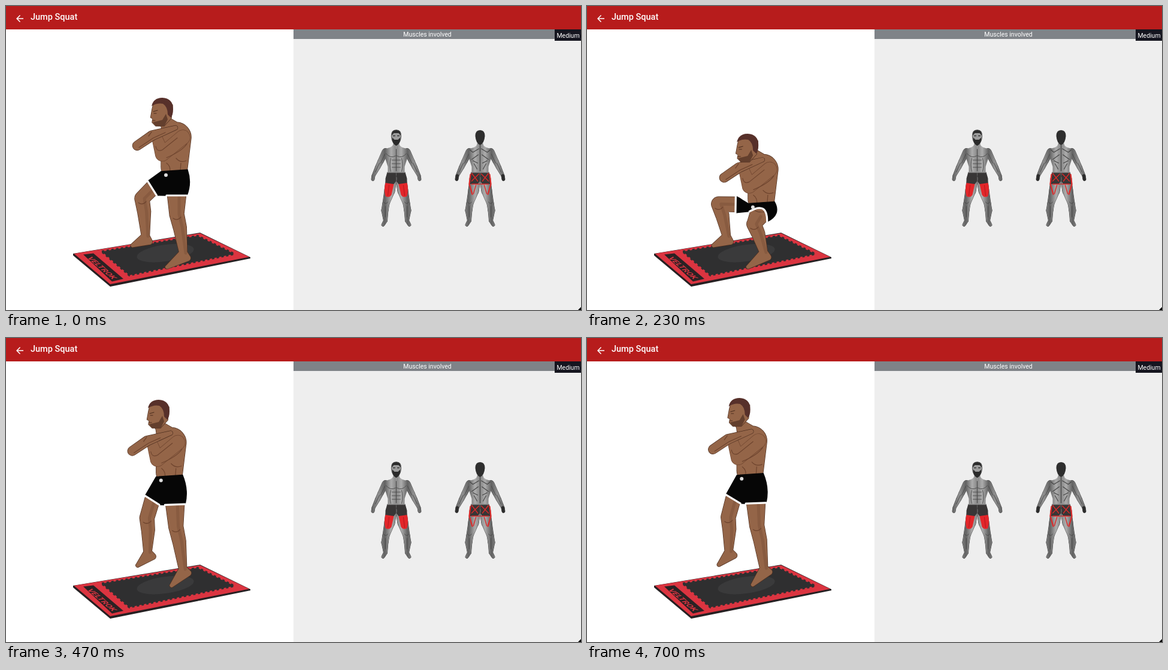
An HTML page that plays this animation: 960 px wide and 507 px high, repeating every 0.78 s.

```html
<!DOCTYPE html>
<html lang="en">
<head>
<meta charset="utf-8">
<title>Jump Squat</title>
<style>
  html, body { margin: 0; width: 100%; height: 100%; overflow: hidden; background: #fff; }
  svg { display: block; width: 960px; height: 507px; font-family: Roboto, sans-serif; }
</style>
</head>
<body>
<svg viewBox="0 0 960 507">
  <defs>
    <linearGradient id="grey" gradientUnits="userSpaceOnUse" x1="0" x2="42">
      <stop offset="0" stop-color="#858585"/><stop offset=".2" stop-color="#adadad"/>
      <stop offset=".45" stop-color="#626262"/><stop offset=".7" stop-color="#929292"/>
      <stop offset="1" stop-color="#606060"/>
    </linearGradient>
    <clipPath id="crop"><path d="M0 82H480V507H0z"/></clipPath>
  </defs>

  <path fill="#b71c1c" d="M0 0H960V39H0z"/>
  <path fill="#fff" transform="translate(14 12) scale(.75)" d="M20 11H7.83l5.59-5.59L12 4l-8 8 8 8 1.41-1.41L7.83 13H20z"/>
  <text x="41" y="23" font-size="14.5" font-weight="500" fill="#fff">Jump Squat</text>

  <path fill="#eee" d="M480 55H960V507H480z"/>
  <path fill="#7f8388" d="M480 39H960V55H480z"/>
  <text x="703.5" y="51" font-size="10.5" text-anchor="middle" fill="#fff">Muscles involved</text>
  <path fill="#15151f" d="M916 39H960V58H916z"/>
  <text x="938.5" y="53" font-size="10.5" text-anchor="middle" fill="#fff">Medium</text>
  <path d="M960 502V507H955z"/>
  <g id="muscles"></g>

  <g id="mat">
    <path fill="#262022" d="M112 413L324 378L408 419V421L174 468L112 416z"/>
    <path fill="#db3440" d="M113.500 413L324 379L406 418.500L174 464z"/>
    <path fill="#2f2f30" stroke="#2f2f30" stroke-width="3.500" stroke-dasharray="4 4" d="M160 409.500L320 383.500L381 413.500L206 449z"/>
    <ellipse cx="266" cy="412" rx="48" ry="14" transform="rotate(-8 266 412)" fill="#3a3a3b"/>
    <path fill="#2a2224" d="M129 414.500L146 412.500L196 455L177 459.500z"/>
    <text transform="matrix(.77 .66 -.97 .17 160.500 436.800)" y="4.600" font-size="13" font-weight="700" text-anchor="middle" fill="#db3440">VELTROK</text>
  </g>
  <g id="man" clip-path="url(#crop)"></g>
</svg>

<script>
const SKIN = '#946548', SHADE = '#6e442e', LINE = '#4d2e1f', HAIR = '#57302a';
const el = id => document.getElementById(id);

const add = (p, q, k = 1) => [p[0] + q[0] * k, p[1] + q[1] * k];
const mix = (p, q, k) => p.map((v, i) => v + (q[i] - v) * k);
const toward = (p, q, size = 1) => {
  const d = add(q, p, -1), k = size / (Math.hypot(...d) || 1);
  return [d[0] * k, d[1] * k];
};
const normal = (p, q, size) => {
  const [x, y] = toward(p, q, size);
  return [y, -x];
};

// Outline of a limb: discs [x, y, radius] joined by tapering segments
function limb(...discs) {
  return discs.slice(1).map((q, i) => {
    const p = discs[i], n = normal(p, q, 1), r = p[2], s = q[2];
    return `M${add(p, n, r)}L${add(q, n, s)}A${s} ${s} 0 0 1 ${add(q, n, -s)}`
      + `L${add(p, n, -r)}A${r} ${r} 0 0 1 ${add(p, n, r)}z`;
  }).join('');
}
const fill = (d, color, line = 'none', width = 1.4) =>
  `<path d="${d}" fill="${color}" stroke="${line}" stroke-width="${width}" paint-order="stroke"/>`;
const stroke = (d, color, width, alpha = 1) =>
  `<path d="${d}" fill="none" stroke="${color}" stroke-width="${width}" opacity="${alpha}" stroke-linecap="round" stroke-linejoin="round"/>`;
const move = (content, x, y) => `<g transform="translate(${x} ${y})">${content}</g>`;

// ---- muscle chart: one half of the body, mirrored ----
const halfBody =
  fill(limb([8, 288, 9], [11, 308, 8.5], [17, 329, 5.5], [19, 341, 5.5], [18, 358, 3], [22, 365, 2.5]), 'url(#grey)', '#444', 1)
  + fill(limb([18, 243, 5.5], [26, 259, 4.5], [31, 269, 4], [38, 283, 2.5], [39, 289, 2.5]), 'url(#grey)', '#444', 1)
  + fill('M0 229H5Q5 235 14 237Q23 239 19 252L14 268V280H0z', 'url(#grey)')
  + stroke('M14 327Q18 332 21 327M18 334V352M19 247L26 262M28 262L35 277', '#484848', .9)
  + fill('M0 277H15L18 288L17 297H4L0 292z', '#383636') + stroke('M0 277.500H15', '#8a8a8a', 1.3);
const frontHalf = stroke('M0 239V275M1 250Q10 255 17 246M0 257H7M0 263H7M0 269H7M9 254Q12 265 9 276', '#484848', .9)
  + fill('M4 297L18 295Q21 305 18 317Q12 321 8 315z', '#e3262a') + stroke('M12 299L14 316', '#a3181c', .8);
const backHalf = stroke('M0 232V275M2 238L12 244L17 240M3 248L14 256M4 262L12 258M5 272L10 263', '#444', 1.1)
  + stroke('M2 280L14 292M14 279L4 292M1 297H14M7 299L11 313', '#dc2a2a', 1.4)
  + stroke('M16 281L18 297L13 314', '#dc2a2a', 2.2) + fill(limb([38, 283, 2.5], [39, 289, 2.5]), '#2c2c2c');
const skull = 'M0 207Q8 207 8 217Q7 229 0 232Q-7 229 -8 217Q-8 207 0 207z';
const face = fill(skull, '#9c9c9c', '#444')
  + fill('M0 207Q8 207 7.500 216L4 212H-4L-7.500 216Q-8 207 0 207z', '#2c2c2c')
  + fill('M-7 219L-3 223H3L7 219Q7 230 0 233Q-7 230 -7 219z', '#2a2a2a')
  + stroke('M-5 216.500H-2M2 216.500H5', '#333', 1.3);

function figure(x, half, head) {
  const side = halfBody + half;
  return move(`${side}<g transform="scale(-1 1)">${side}</g>${head}`, x, 0);
}
el('muscles').innerHTML = figure(651.5, frontHalf, face) + figure(791.5, backHalf, fill(skull, '#2e2e2e'));

// ---- athlete ----
const torso = fill(limb([266, 192, 9], [284, 219, 25], [281, 268, 22]), SKIN, LINE)
  + stroke('M268 262Q276 268 273 278M284 254Q291 262 301 258M292 262L291 275', SHADE, 1.2)
  + fill(limb([295, 219, 12], [261, 247, 11.5], [251, 216, 8]), SKIN, SHADE)
  + stroke('M250 234Q252 244 261 240L286 220M268 253Q294 242 302 230', SHADE, 1.2)
  + fill(limb([219, 233, 7.5], [244, 216, 8], [283, 203, 3.5]), SKIN, LINE)
  + stroke('M222 236L246 220L266 211M243 210L238 217', SHADE, 1.3);
const head = fill('M247 160L244 172L241.500 186L245 188L244 194L250 200H264L276 187L278 165Q262 153 247 160z', SKIN, LINE)
  + fill('M245 194L261 190L267 180L270 189L264 201L250 200z', '#633f2d')
  + fill('M243 167Q246 153 261 153Q279 154 279 172Q279 182 275 186L270 181Q270 168 262 163Q252 161 243 167z', HAIR)
  + stroke('M246 176L253 174M247 179H251M245 191H249', LINE, 1.2);

// Each joint at the top of the jump, standing, and in the squat
const JOINTS = {
  farHem: [[244, 256], [244, 304], [248, 330]],
  farKnee: [[239, 291], [227, 321], [220, 330]],
  farAnkle: [[238, 346], [233, 384], [233, 384]],
  farToe: [[222, 373], [209, 401], [209, 401]],
  nearHem: [[281, 261], [285, 316], [286, 350]],
  nearKnee: [[283, 300], [285, 347], [279, 363]],
  nearAnkle: [[295, 374], [296, 412], [295, 411]],
  nearToe: [[278, 406], [266, 438], [266, 438]]
};
const TOP = -72, BOTTOM = 58;

function leg(hem, knee, ankle, toe, width) {
  const calf = add(mix(knee, ankle, .35), normal(knee, ankle, 1.5));
  const heel = add(ankle, normal(ankle, toe, 11)), tip = mix(toe, ankle, .1);
  const shadow = [hem, knee, calf, ankle].map(p => add(p, [4, 0]));
  const outline = limb([...hem, width], [...knee, 12], [...calf, 11], [...ankle, 6.5], [...tip, 3], [...heel, 5], [...ankle, 6.5]);
  return fill(outline, SKIN, LINE)
    + stroke(`M${shadow.join('L')}`, SHADE, 5, .3)
    + stroke(`M${add(knee, [-6, 7])}q7 5 13 -2`, SHADE, 1.2);
}

// Hem across a thigh: two ends and the control point of its arch
function hemline(hem, aim, width, arch) {
  const n = normal(hem, aim, width);
  return [add(hem, n), add(hem, toward(hem, aim), -arch), add(hem, n, -1)];
}

// drop: how far the head is below its standing height
function athlete(drop) {
  const j = {};
  for (const [name, [top, stand, squat]] of Object.entries(JOINTS))
    j[name] = drop < 0 ? mix(stand, top, drop / TOP) : mix(stand, squat, drop / BOTTOM);

  const shift = [drop * .165, drop * .89], bend = Math.max(0, drop);
  const waistL = add([259, 276], shift), waistR = add([303, 273], shift);
  const far = hemline(j.farHem, add(j.farKnee, [-10, 0]), 14, 0);
  const near = hemline(j.nearHem, j.nearKnee, 17, bend * .5);
  const seat = add(mix(waistR, near[0], .5), [8 + bend * .17, bend * .08]);
  const curve = ([a, c, b]) => `${a}Q${c} ${b}`;

  return leg(j.farHem, j.farKnee, j.farAnkle, j.farToe, 12.5)
    + leg(j.nearHem, j.nearKnee, j.nearAnkle, j.nearToe, 15.5)
    + move(torso, ...shift) + move(head, drop * .12, drop)
    + fill(`M${waistL}L${waistR}Q${seat} ${curve(near)}L${curve(far)}z`, '#060606', '#060606')
    + stroke(`M${curve(far)}M${curve(near)}`, '#fff', 3.2)
    + move('<circle r="3" fill="#ddd"/>', ...add(waistL, [8, 6]));
}

// [end time in ms, drop]
const STEPS = [[70, 0], [140, 32], [230, 58], [320, 60], [380, 45], [470, -6], [550, -50], [630, -72], [700, -69], [780, -53]];
let shown;
function tick() {
  const time = performance.now() % 780;
  const [, drop] = STEPS.find(([end]) => time < end);
  if (drop !== shown) el('man').innerHTML = athlete(shown = drop);
  requestAnimationFrame(tick);
}
tick();
</script>
</body>
</html>
```
